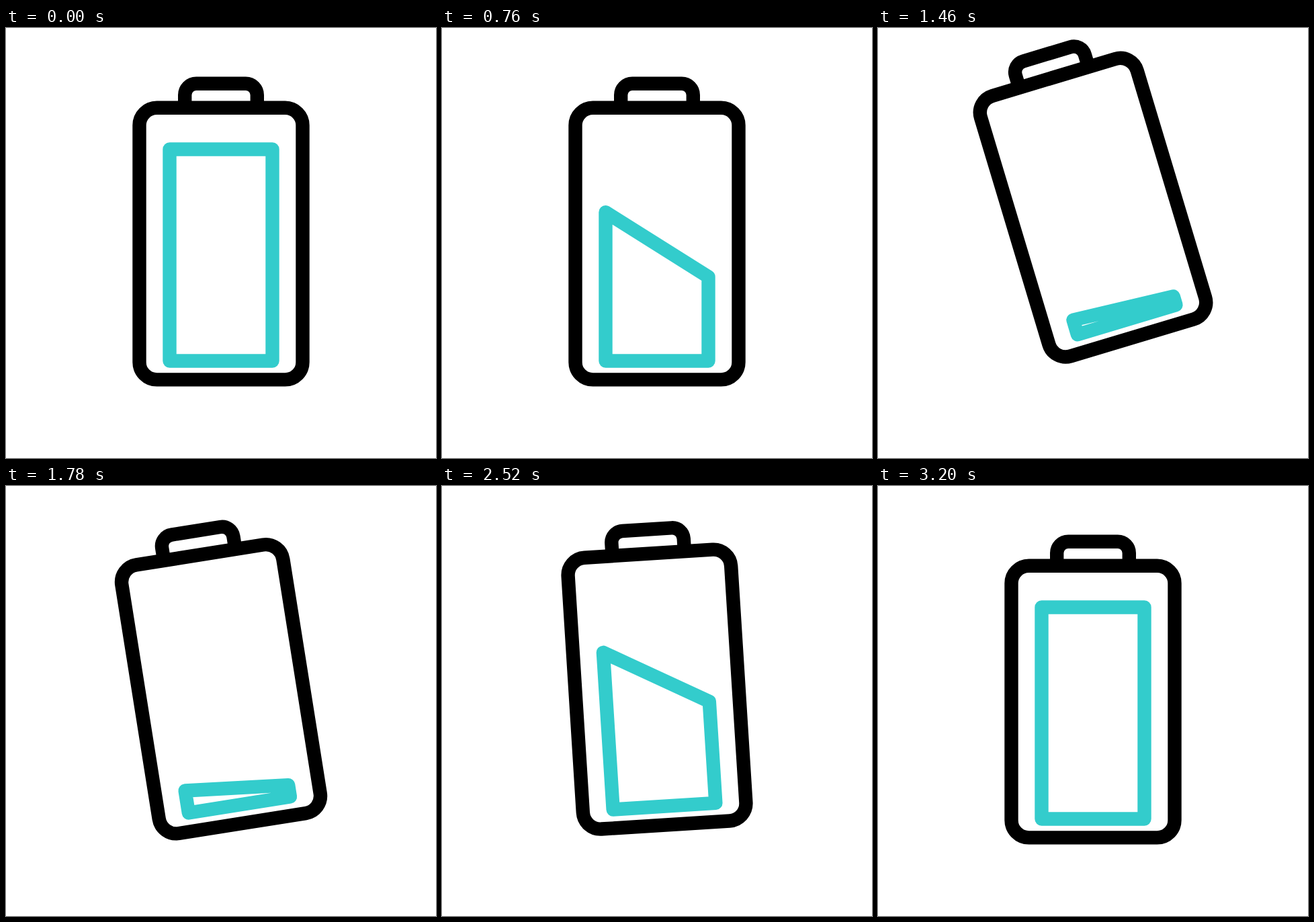
An HTML page that plays this animation: 640x640 px, repeating every 3.42 s.

```html
<!DOCTYPE html>
<html lang="en">
<head>
<meta charset="utf-8">
<title>Battery</title>
<style>
  html, body { margin: 0; height: 100%; overflow: hidden; background: #fff; }
  svg { display: block; width: 100%; height: 100%; }
</style>
</head>
<body>
<svg viewBox="0 0 640 640" fill="none" stroke="#000" stroke-width="20.4">
  <g id="battery">
    <path d="M266.2 119V99.7a17 17 0 0 1 17-17h73.6a17 17 0 0 1 17 17V119"/>
    <rect x="198.5" y="118.8" width="243" height="404.6" rx="26"/>
    <path id="charge" stroke="#3cc" stroke-linejoin="round"/>
  </g>
</svg>
<script>
const LOOP = 3420, FULL = 315, LOW = 13.2;
const JUMP = 880, PEAK = 1600, BEAT = 392;   // hop timing, ms
const REFILL = 1680, REFILLED = 3200;
const BOTTOM = 495.5, LEFT = 243.5, RIGHT = 396.5;

// Rest, leap, landing, small hop, rest
const tilts = [0, -20, 5, -5, 0];
const lifts = [0, -64.5, 39.5, -25.6, 0];

const mix = (a, b, f) => a + (b - a) * f;

// Bezier easing with handles (a, 0) and (b, 1); the defaults give smoothstep
function ease(u, a = 1 / 3, b = 2 / 3) {
  if (u <= 0 || u >= 1) return u <= 0 ? 0 : 1;
  let s = 0;
  for (let step = .5; step > 1e-6; step /= 2) {
    const p = s + step, q = 1 - p;
    if (3 * p * q * (q * a + p * b) + p ** 3 < u) s = p;
  }
  return s * s * (3 - 2 * s);
}

function hop(t) {
  if (t < PEAK) return [0, ease((t - JUMP) / (PEAK - JUMP), .37, .8)];
  const beats = (t - PEAK) / BEAT, i = Math.min(Math.floor(beats), 2);
  return [i + 1, ease(beats - i)];
}

function level(t, start, duration, a, b) {
  return t < REFILL
    ? mix(FULL, LOW, ease((t - start) / duration))
    : mix(LOW, FULL, ease((t - REFILL) / (REFILLED - REFILL), a, b));
}

const battery = document.getElementById('battery');
const charge = document.getElementById('charge');

function draw(t) {
  const [i, f] = hop(t);
  const lift = mix(lifts[i], lifts[i + 1], f);
  const tilt = mix(tilts[i], tilts[i + 1], f);
  battery.setAttribute('transform', `translate(0 ${lift}) rotate(${tilt} 320 321)`);

  const left = BOTTOM - level(t, 265, 1335, .08, .555);
  const right = BOTTOM - level(t, 0, 1295, .28, .955);
  charge.setAttribute('d', `M${LEFT} ${BOTTOM}V${left}L${RIGHT} ${right}V${BOTTOM}Z`);
}

let start;
function tick(now) {
  start ??= now;
  draw((now - start) % LOOP);
  requestAnimationFrame(tick);
}
draw(0);
requestAnimationFrame(tick);
</script>
</body>
</html>
```
